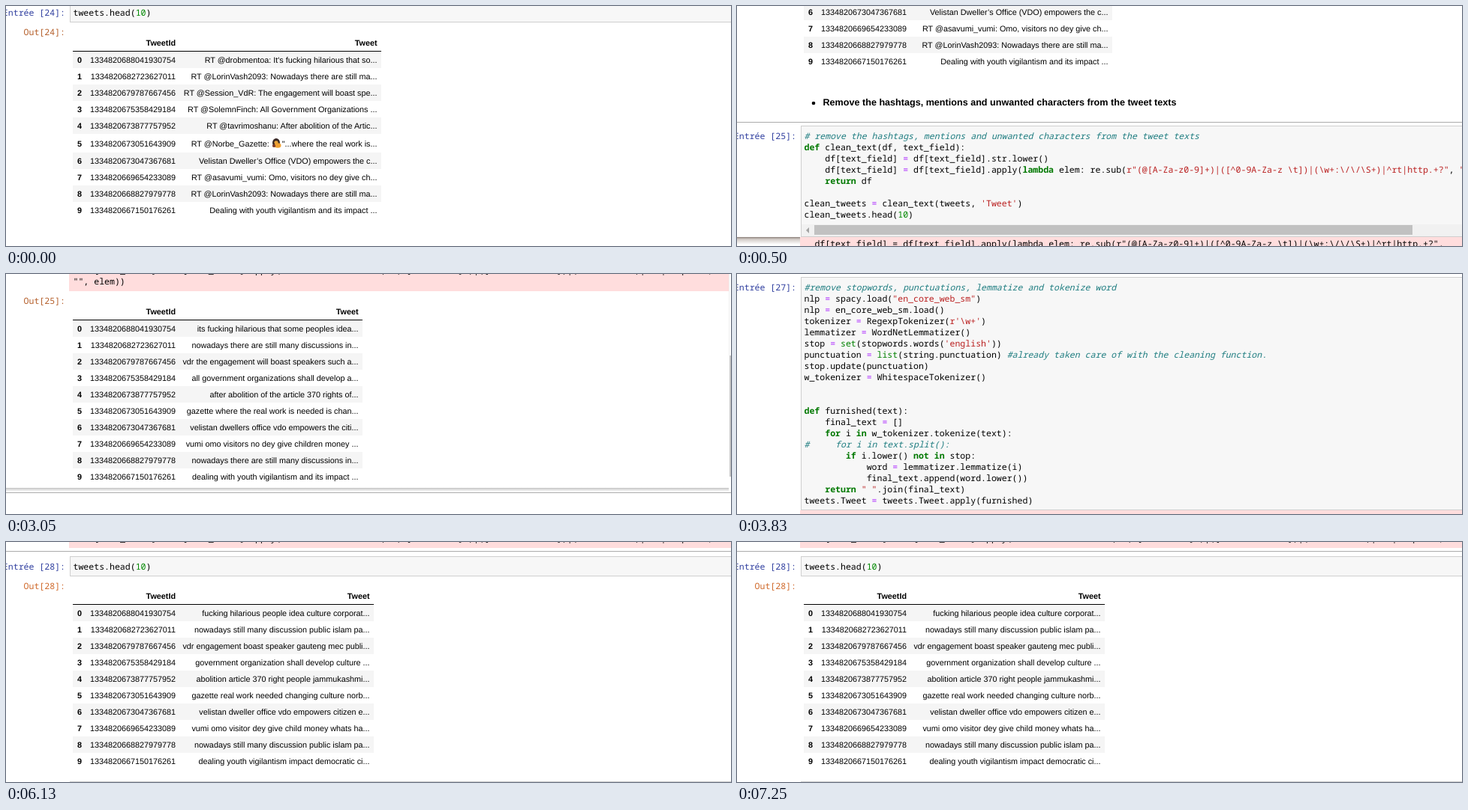
An HTML page with a canvas that plays this animation: 966x321 px, repeating every 8 s.

```html
<!DOCTYPE html>
<html lang="en">
<head>
<meta charset="utf-8">
<title>Notebook text cleaning</title>
<style>
html, body { margin: 0; width: 100%; height: 100%; overflow: hidden; background: #fff; }
canvas { display: block; }
</style>
</head>
<body>
<canvas id="stage" width="966" height="321"></canvas>
<script>
const ctx = document.getElementById('stage').getContext('2d', { alpha: false });
const W = 966, H = 321, LOOP = 8000;
const MONO = '11.55px "Noto Sans Mono", "DejaVu Sans Mono", monospace';
const SANS = '10.8px "Liberation Sans", Arial, sans-serif';
const CODE_X = 89.5, LINE = 15, ROW = 22;
const PINK = '#ffdddd';

const ids = ['1334820688041930754', '1334820682723627011', '1334820679787667456',
  '1334820675358429184', '1334820673877757952', '1334820673051643909',
  '1334820673047367681', '1334820669654233089', '1334820668827979778',
  '1334820667150176261'];

const rawTweets = [
  "RT @drobmentoa: It's fucking hilarious that so...",
  'RT @LorinVash2093: Nowadays there are still ma...',
  'RT @Session_VdR: The engagement will boast spe...',
  'RT @SolemnFinch: All Government Organizations ...',
  'RT @tavrimoshanu: After abolition of the Artic...',
  'RT @Norbe_Gazette: \u2003 "...where the real work is...',
  'Velistan Dweller’s Office (VDO) empowers the c...',
  'RT @asavumi_vumi: Omo, visitors no dey give ch...',
  'RT @LorinVash2093: Nowadays there are still ma...',
  'Dealing with youth vigilantism and its impact ...'];

const cleanTweets = [
  'its fucking hilarious that some peoples idea...',
  'nowadays there are still many discussions in...',
  'vdr the engagement will boast speakers such a...',
  'all government organizations shall develop a...',
  'after abolition of the article 370 rights of...',
  'gazette where the real work is needed is chan...',
  'velistan dwellers office vdo empowers the citi...',
  'vumi omo visitors no dey give children money ...',
  'nowadays there are still many discussions in...',
  'dealing with youth vigilantism and its impact ...'];

const finalTweets = [
  'fucking hilarious people idea culture corporat...',
  'nowadays still many discussion public islam pa...',
  'vdr engagement boast speaker gauteng mec publi...',
  'government organization shall develop culture ...',
  'abolition article 370 right people jammukashmi...',
  'gazette real work needed changing culture norb...',
  'velistan dweller office vdo empowers citizen e...',
  'vumi omo visitor dey give child money whats ha...',
  'nowadays still many discussion public islam pa...',
  'dealing youth vigilantism impact democratic ci...'];

const applyCall = String.raw`df[text_field] = df[text_field].apply(lambda elem: re.sub(r"(@[A-Za-z0-9]+)|([^0-9A-Za-z \t])|(\w+:\/\/\S+)|^rt|http.+?", `;

const cleanCode = `# remove the hashtags, mentions and unwanted characters from the tweet texts
def clean_text(df, text_field):
    df[text_field] = df[text_field].str.lower()
    ${applyCall}"", elem))
    return df

clean_tweets = clean_text(tweets, 'Tweet')
clean_tweets.head(10)`;

const lemmaCode = String.raw`#remove stopwords, punctuations, lemmatize and tokenize word
nlp = spacy.load("en_core_web_sm")
nlp = en_core_web_sm.load()
tokenizer = RegexpTokenizer(r'\w+')
lemmatizer = WordNetLemmatizer()
stop = set(stopwords.words('english'))
punctuation = list(string.punctuation) #already taken care of with the cleaning function.
stop.update(punctuation)
w_tokenizer = WhitespaceTokenizer()


def furnished(text):
    final_text = []
    for i in w_tokenizer.tokenize(text):
#     for i in text.split():
        if i.lower() not in stop:
            word = lemmatizer.lemmatize(i)
            final_text.append(word.lower())
    return " ".join(final_text)
tweets.Tweet = tweets.Tweet.apply(furnished)`;

const TOKEN = /(#.*)|(r?"[^"]*"|r?'[^']*')|\b(def|return|lambda|for|in|if|not)\b|\b(set|list)\b|\b(\d+)\b|(=)/g;
const STYLES = [['italic ', '#1f7d80'], ['', '#ba2121'], ['bold ', '#007800'],
  ['', '#008000'], ['', '#008800'], ['', '#aa22ff']];

function rect(x, y, w, h, color) {
  ctx.fillStyle = color;
  ctx.fillRect(x, y, w, h);
}

function text(str, x, y, font = MONO, color = '#000', align = 'left') {
  ctx.font = font;
  ctx.fillStyle = color;
  ctx.textAlign = align;
  ctx.fillText(str, x, y);
}

function codeLine(line, y) {
  ctx.font = MONO;
  const step = ctx.measureText('0').width;
  let at = 0;
  const put = (str, [weight, color]) => {
    text(str, CODE_X + at * step, y, weight + MONO, color);
    at += str.length;
  };
  for (const m of line.matchAll(TOKEN)) {
    put(line.slice(at, m.index), ['', '#000']);
    put(m[0], STYLES[m.slice(1).findIndex(Boolean)]);
  }
  put(line.slice(at), ['', '#000']);
}

function code(src, y) {
  src.split('\n').forEach((line, i) => codeLine(line, y + i * LINE));
}

function inputBox(top, bottom) {
  rect(85, top, W, bottom - top, '#cfcfcf');
  rect(86, top + 1, W, bottom - top - 2, '#f7f7f7');
}

const inPrompt = (n, y) => text(`Entrée [${n}]:`, 79, y, MONO, '#303f9f', 'right');
const outPrompt = (n, y, color) => text(`Out[${n}]:`, 79, y, MONO, color, 'right');

// Masked figure holding a bag, standing in for the emoji glyph
function figure(x, y) {
  const dot = (dx, dy, rx, ry, color) => {
    ctx.fillStyle = color;
    ctx.beginPath();
    ctx.ellipse(x + dx, y + dy, rx, ry, 0, 0, Math.PI * 2);
    ctx.fill();
  };
  dot(6, 6, 5, 6, '#3b2a26');
  dot(6, 5.5, 2.6, 2.2, '#e9a43a');
  dot(8, 9.5, 4.5, 3.2, '#f0a030');
  dot(3, 10, 2.2, 2, '#7a3b2c');
}

// Data frame whose first body row starts at top; tall adds height to row 5
function table(tweets, top, right, tall = 0) {
  const edge = right - 5.5;
  text('TweetId', 226, top - 8, 'bold ' + SANS, '#000', 'right');
  text('Tweet', edge, top - 8, 'bold ' + SANS, '#000', 'right');
  rect(89, top - 1, right - 89, 1, '#000');
  let y = top;
  tweets.forEach((tweet, i) => {
    const h = ROW + (i === 5 ? tall : 0);
    const base = Math.round(y + 15 + (h - ROW) / 2);
    if (i % 2 === 0) rect(89, y, right - 89, h, '#f5f5f5');
    text(i, 101, base, 'bold ' + SANS, '#000', 'right');
    text(ids[i], 226, base, SANS, '#000', 'right');
    text(tweet, edge, base, SANS, '#000', 'right');
    y += h;
  });
}

function rawTable(top) {
  table(rawTweets, top, 500, 3);
  figure(354, top + 116);
}

function showRaw() {
  inputBox(-5, 22);
  inPrompt(24, 13);
  code('tweets.head(10)', 13);
  outPrompt(24, 39, '#b5602c');
  rawTable(61);
}

function scrollbar() {
  rect(86, 292, W, 16, '#f1f1f1');
  rect(103, 293, 797, 13, '#c1c1c1');
  ctx.fillStyle = '#a3a3a3';
  ctx.beginPath();
  ctx.moveTo(92, 300);
  ctx.lineTo(96, 296);
  ctx.lineTo(96, 304);
  ctx.fill();
}

function showClean() {
  rawTable(-138);
  ctx.fillStyle = '#000';
  ctx.beginPath();
  ctx.arc(102, 130, 2.3, 0, Math.PI * 2);
  ctx.fill();
  text('Remove the hashtags, mentions and unwanted characters from the tweet texts',
    114.5, 133, 'bold 12.6px "Liberation Sans", Arial, sans-serif');
  rect(0, 155, W, 1, '#ababab');

  const shade = ctx.createLinearGradient(0, 309, 0, 319);
  shade.addColorStop(0, '#8d827c');
  shade.addColorStop(0.3, '#d3ccc8');
  shade.addColorStop(1, '#fff');
  rect(0, 309, 84, 10, shade);
  rect(84, 309, W, 12, PINK);
  text(applyCall, 103.4, 322);

  inputBox(160, 309);
  inPrompt(25, 178);
  code(cleanCode, 178);
  scrollbar();
}

function showCleaned() {
  rect(84, 0, 879, 23, PINK);
  text(applyCall, 103.4, -1);
  text('"", elem))', CODE_X, 14);
  outPrompt(25, 40, '#b5602c');
  table(cleanTweets, 62, 475);
  rect(963, 0, 1, 109, '#f0f0f0');
  rect(964, 109, 2, 162, '#c6c6c6');
  const shade = ctx.createLinearGradient(0, 286, 0, 291);
  shade.addColorStop(0, '#c4c4c4');
  shade.addColorStop(1, '#fff');
  rect(0, 286, 963, 5, shade);
  rect(0, 292, W, 1, '#ababab');
}

function showLemma() {
  inputBox(4, 316);
  inPrompt(27, 22);
  code(lemmaCode, 22);
  rect(84, 316, W, 5, PINK);
}

function showFinal() {
  rect(84, 0, W, 8, PINK);
  text(applyCall, 103.4, -1);
  rect(0, 12, W, 1, '#ababab');
  inputBox(19, 46);
  inPrompt(28, 37);
  code('tweets.head(10)', 37);
  outPrompt(28, 63, '#d06a2c');
  table(finalTweets, 84, 490);
  rect(85, 320, W, 1, '#cfcfcf');
}

const scenes = [[0, showRaw], [500, showClean], [1890, showCleaned],
  [3830, showLemma], [6130, showFinal]];
let shown = null;

function tick() {
  const t = performance.now() % LOOP;
  const draw = scenes.findLast(([start]) => t >= start)[1];
  if (draw !== shown) {
    shown = draw;
    ctx.textRendering = 'geometricPrecision';
    rect(0, 0, W, H, '#fff');
    draw();
  }
  requestAnimationFrame(tick);
}
tick();
</script>
</body>
</html>
```
